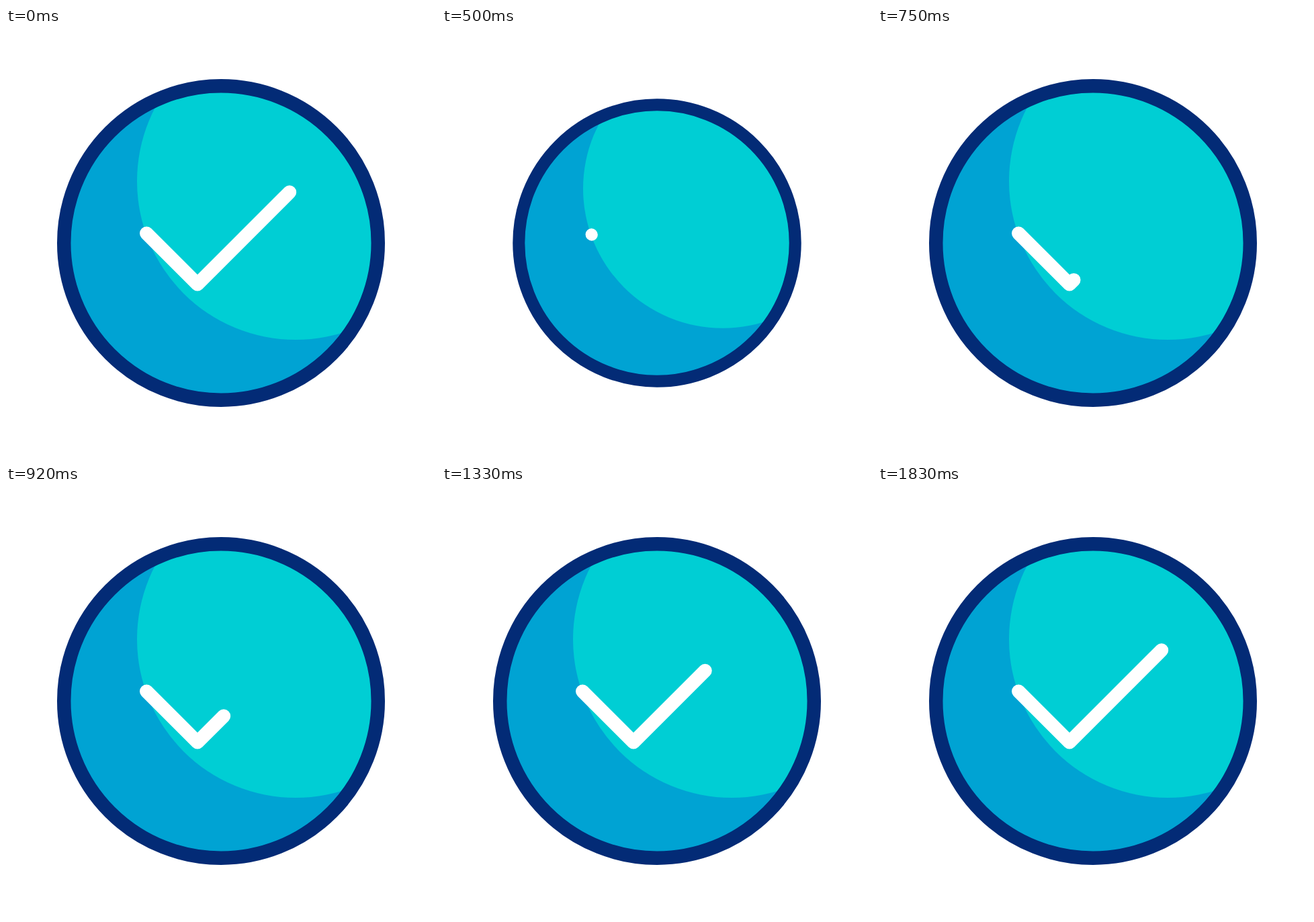
Animation of 640 by 640 pixels, one loop 2000 ms. Source, as an HTML page:

```html
<!DOCTYPE html>
<html lang="en">
<head>
<meta charset="utf-8">
<title>Check badge</title>
<style>
  html, body { margin: 0; width: 100%; height: 100%; overflow: hidden; background: #fff; }
  svg { display: block; width: 100%; height: 100%; }
</style>
</head>
<body>
<svg viewBox="0 0 640 640">
  <clipPath id="disc"><circle cx="320" cy="320" r="230"/></clipPath>
  <g id="badge">
    <g clip-path="url(#disc)">
      <circle cx="320" cy="320" r="230" fill="#00a3d3"/>
      <circle cx="431" cy="228" r="236" fill="#00ced4"/>
    </g>
    <circle cx="320" cy="320" r="233.75" fill="none" stroke="#032b76" stroke-width="20.5"/>
    <path id="tick" d="M209.2 305.6 L285 381.4 L422 244.4" pathLength="1" fill="none" stroke="#fff"
      stroke-width="20.4" stroke-linecap="round" stroke-linejoin="round"/>
  </g>
</svg>
<script>
  const LOOP = 2000, SMALL = 0.88, MID = 0.385;
  const badge = document.getElementById('badge');
  const tick = document.getElementById('tick');

  const span = (t, from, to) => Math.min(1, Math.max(0, (t - from) / (to - from)));
  const smooth = u => u * u * (3 - 2 * u);

  // Drawn share of the tick: retracts, rests, then redraws fast and slows down
  function drawn(t) {
    if (t < 250) return 1 - smooth(span(t, 0, 250));
    if (t < 750) {
      const u = span(t, 500, 750);
      return MID * u * (1.41 - 0.41 * u);
    }
    const u = span(t, 750, 1830);
    return u === 1 ? 1 : MID + (1 - MID) * Math.min(1, 1.6 * u - 0.6 * u ** 3);
  }

  function draw(now) {
    const t = now % LOOP;
    const shrink = smooth(span(t, 0, 250)) - smooth(span(t, 500, 750));
    const scale = 1 - (1 - SMALL) * shrink;
    badge.setAttribute('transform', `translate(320 320) scale(${scale}) translate(-320 -320)`);

    const hidden = t >= 250 && t < 500;
    tick.setAttribute('visibility', hidden ? 'hidden' : 'visible');
    const part = Math.max(0.001, drawn(t));
    tick.setAttribute('stroke-dasharray', part < 1 ? `${part} 2` : 'none');
  }

  const start = performance.now();
  function loop() {
    draw(performance.now() - start);
    requestAnimationFrame(loop);
  }
  loop();
</script>
</body>
</html>
```
